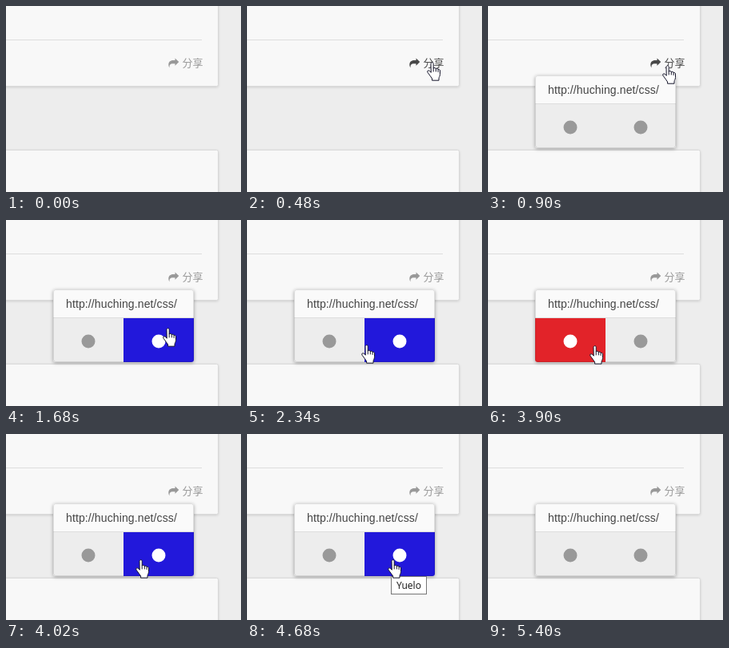
Recreate the animation shown at these times as an HTML page. Size 294 by 233 pixels, loop 6.18 s.

```html
<!DOCTYPE html>
<html lang="zh-CN">
<head>
<meta charset="utf-8">
<title>Share menu</title>
<style>
html, body { margin: 0; width: 100%; height: 100%; overflow: hidden; background: #ededed; }
svg { display: block; width: 294px; height: 233px; }

.card { fill: #f8f8f8; stroke: #d9d9d9; filter: drop-shadow(0 1px 1.5px rgba(0,0,0,.13)); }
.line { stroke: #ddd; }
.url { font: 14px "Liberation Sans", Arial, sans-serif; letter-spacing: .12px; fill: #444; }
.share { fill: #999; font: 13px "Noto Sans CJK SC", "Noto Sans CJK", sans-serif; }
.tip rect { fill: #fff; stroke: #767676; }
.tip text { font: 12px "Noto Sans", sans-serif; fill: #222; }
.pointer path { fill: #fff; stroke: #15152a; stroke-linejoin: round; stroke-linecap: round; }
.pointer .crease { fill: none; }

/* One loop is 103 ticks of 60 ms; the percentages are ticks / 103. */
.share, .popup, .left, .right, .left + circle, .right + circle, .tip, .pointer, .hand, .arrow {
  animation: 6180ms step-end infinite;
}
.share { animation-name: share; }
.popup { animation-name: popup; }
.left { animation-name: left; }
.left + circle { animation-name: left-icon; }
.right { animation-name: right; }
.right + circle { animation-name: right-icon; }
.tip.a { animation-name: tip-a; }
.tip.b { animation-name: tip-b; }
.pointer { animation-name: move; }
.hand { animation-name: hand; }
.arrow { animation-name: arrow; }

@keyframes share { 0%, 24.271% { fill: #999; } 6.796% { fill: #484848; } }
@keyframes popup { 0% { visibility: hidden; } 14.563%, 100% { visibility: visible; } }
@keyframes left { 0%, 64.077% { fill: #ededed; } 38.834% { fill: #e22329; } }
@keyframes left-icon { 0%, 64.077% { fill: #999; } 38.834% { fill: #fff; } }
@keyframes right {
  0%, 38.834%, 85.436% { fill: #ededed; }
  27.184%, 64.077% { fill: #2218db; }
}
@keyframes right-icon {
  0%, 38.834%, 85.436% { fill: #999; }
  27.184%, 64.077% { fill: #fff; }
}
@keyframes tip-a { 0%, 63.106% { visibility: hidden; } 48.543% { visibility: visible; } }
@keyframes tip-b { 0%, 83.495% { visibility: hidden; } 75.728% { visibility: visible; } }
@keyframes hand {
  0%, 24.271%, 85.436% { opacity: 0; }
  6.796%, 27.184% { opacity: 1; }
}
@keyframes arrow {
  0%, 24.271%, 85.436% { opacity: 1; }
  6.796%, 27.184% { opacity: 0; }
}
@keyframes move {
  0% { transform: translate(310px, 30px); }
  2.912% { transform: translate(282px, 34px); animation-timing-function: steps(3); }
  5.825% { transform: translate(240px, 58px); animation-timing-function: steps(2); }
  7.767% { transform: translate(225px, 70px); animation-timing-function: steps(2); }
  9.708% { transform: translate(218px, 74px); }
  23.3% { transform: translate(214px, 82px); animation-timing-function: steps(4); }
  27.184% { transform: translate(196px, 135px); animation-timing-function: steps(2); }
  29.126% { transform: translate(184px, 148px); animation-timing-function: steps(2); }
  31.067% { transform: translate(178px, 152px); }
  36.893% { transform: translate(162px, 154px); }
  37.864% { transform: translate(143px, 156px); }
  38.834% { transform: translate(118px, 157px); }
  39.805% { transform: translate(102px, 157px); }
  63.106% { transform: translate(127px, 157px); animation-timing-function: steps(2); }
  65.048% { transform: translate(162px, 157px); animation-timing-function: steps(2); }
  66.99% { transform: translate(176px, 157px); }
  83.495% { transform: translate(184px, 157px); }
  84.466% { transform: translate(207px, 158px); }
  85.436% { transform: translate(237px, 160px); }
  86.407% { transform: translate(271px, 162px); }
  87.378%, 100% { transform: translate(310px, 164px); }
}
</style>
</head>
<body>
<svg viewBox="0 0 294 233">
  <defs>
    <clipPath id="round"><rect x="59" y="87" width="176" height="91" rx="3"/></clipPath>
  </defs>

  <rect class="card" x="-9.5" y="-9.5" width="275" height="110" rx="2"/>
  <rect class="card" x="-9.5" y="180.5" width="275" height="70" rx="2"/>
  <path class="line" d="M0 42.5H245"/>

  <g class="share">
    <path transform="translate(203.3 65.5)" d="M13 4.6L8.2 0V2.5H6C2 2.5 0 4.8 0 8C0 9.5 .5 10.8 1.3 11.8C.9 8.5 2 6.7 5.8 6.7H8.2V9.2Z"/>
    <text x="220.5" y="76">分享</text>
  </g>

  <g class="popup">
    <rect x="59" y="87" width="176" height="91" rx="3" fill="#fafafa" style="filter:drop-shadow(0 1px 2px rgba(0,0,0,.35))"/>
    <g clip-path="url(#round)">
      <rect class="left" x="59" y="123" width="88" height="55"/>
      <circle cx="103" cy="152" r="8.5"/>
      <rect class="right" x="147" y="123" width="88" height="55"/>
      <circle cx="191" cy="152" r="8.5"/>
    </g>
    <path class="line" d="M59 122.5H235"/>
    <rect x="59.5" y="87.5" width="175" height="90" rx="2.5" fill="none" stroke="#000" stroke-opacity=".1"/>
    <text class="url" x="75" y="110">http://huching.net/css/</text>
  </g>

  <g class="tip a">
    <rect x="106.5" y="178.5" width="51" height="22"/>
    <text x="114" y="194">Mulon</text>
  </g>
  <g class="tip b">
    <rect x="180.5" y="178.5" width="44" height="22"/>
    <text x="187" y="194">Yuelo</text>
  </g>

  <g class="pointer">
    <g class="hand">
      <path d="M5 2.2C5 .1 8.2 .1 8.2 2.2V8C8.8 6.9 11.2 7.2 11.3 8.7C11.9 7.8 14 8.1 14.1 9.6C14.9 9 16.5 9.5 16.5 11V15.5C16.5 18 15 19 15 21V23.2H6.6V21C5 18.5 3 16 1 13.2C-.1 11.6 1.8 10 3.3 11.2L5 13Z"/>
      <path class="crease" d="M8.2 8V12M11.3 8.7V12M14.1 9.6V12.5"/>
    </g>
    <path class="arrow" transform="translate(6 0)" d="M.5 .8V16.5L4.1 13.2L6.6 18.7L9 17.6L6.6 12.2H11.6Z"/>
  </g>
</svg>
</body>
</html>
```
